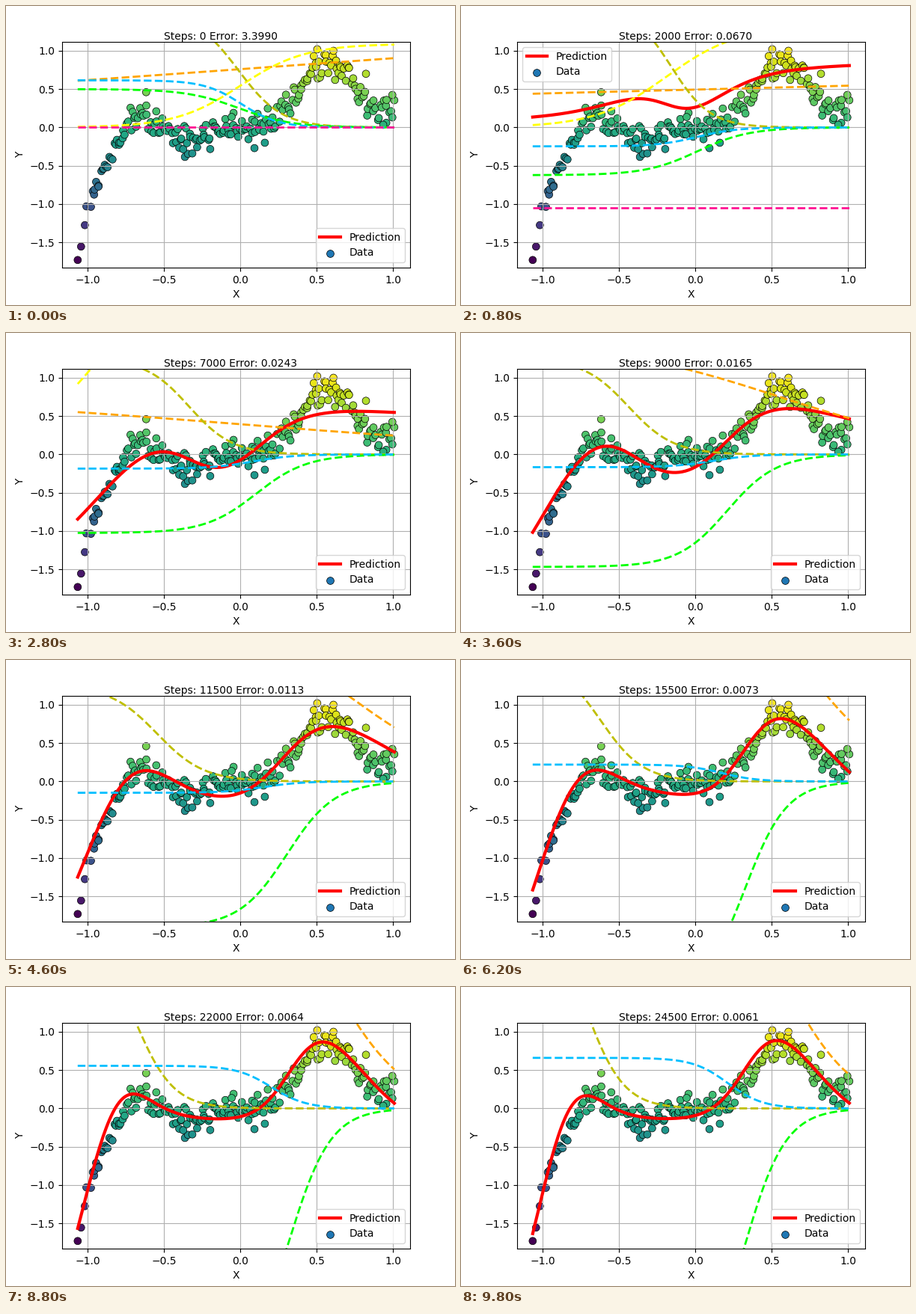
Write a matplotlib script that moves like this. It is 600x400 px and loops after 10 s.

```python
import numpy as np
import matplotlib.pyplot as plt
from matplotlib.animation import FuncAnimation

FRAMES, INTERVAL, STEPS_PER_FRAME = 50, 200, 500
X_MIN, X_MAX = -1.065, 1.0075


def bell(x, height, centre, width):
    return height * np.exp(-((x - centre) / width) ** 2)


def trend(x):
    return (-1.7 * np.exp((X_MIN - x) / .15) + bell(x, .3, -.66, .15)
            + bell(x, -.15, -.33, .2) + bell(x, .88, .58, .25) + bell(x, .2, 1.02, .1))


def neuron(x, v, w, b):
    return v / (1 + np.exp(-(w * x + b)))


# Evenly spread noisy samples, plus the sparse left tail and a few outliers
rng = np.random.default_rng(7)
n = 210
sample_x = np.linspace(-.98, 1.0, n) + rng.uniform(-.006, .006, n)
noise = np.clip(rng.normal(0, .1, n), -.18, .18) * np.interp(sample_x, [-.95, -.7], [.5, 1])
extra = np.array([
    (-1.065, -1.73), (-1.043, -1.555), (-1.018, -1.275), (-1.008, -1.03),
    (-.617, .46), (-.363, -.385), (-.343, -.345), (.503, 1.02), (.62, .62),
    (.16, -.2), (.092, -.27), (.955, .06), (-.045, .19), (.822, .7), (1.0075, .355)])
data_x = np.r_[extra[:, 0], sample_x]
data_y = np.r_[extra[:, 1], np.minimum(trend(sample_x) + noise, 1.0)]

# Training milestones: per neuron the amplitude v, weight w and bias b
milestones = [0, 4000, 7000, 11500, 15500, 24500]
neurons = {
    "orange": ([1.5, .88, .8, 2.2, 3.2, 3.2],
               [.385, .187, -.78, -2.6, -3.3, -4.45],
               [.03, .062, -.03, 1.87, 2.22, 2.65]),
    "yellow": ([1.09, 1.36, 2.66, 3.8, 5, 6.4],
               [4.7, 4.2, 3.65, 5.6, 5.3, 6.2],
               [0, .93, 3.25, 5.55, 5.33, 6.1]),
    "y": ([1.5, 1.6, 1.25, 1.25, 1.58, 2.6],
          [-7, -7.9, -7, -6.5, -7.2, -8],
          [-.1, -1.4, -2.35, -3.55, -4.45, -5.75]),
    "lime": ([.5, -.79, -1.025, -1.9, -2.8, -3.6],
             [-5.8, -5.9, -6, -6.4, -7.3, -7.4],
             [-.05, .1, .62, 1.95, 2.37, 2.38]),
    "deepskyblue": ([.615, -.375, -.185, -.148, .22, .66],
                    [-8.2, -7.7, -7.5, -8, -8.7, -8.7],
                    [.05, .1, .6, 1.2, 1.5, 1.85]),
}
offset = [0, -1.21, -2.35, -4.1, -5.655, -6.75]
error = [3.399, .0373, .0243, .0113, .0073, .0061]


def pace(step):
    """Training moves fast at first, so values drift evenly in log time."""
    return np.log1p(np.asarray(step) / 20)


def at(step, values):
    return np.interp(pace(step), pace(milestones), values)


fig = plt.figure(figsize=(6, 4), dpi=100)
ax = fig.add_axes([.125, .125, .775, .755])
ax.set(xlim=(-1.167, 1.111), ylim=(-1.8295, 1.1165), xlabel="X", ylabel="Y")
ax.grid(True)

dots = dict(s=50, edgecolors="black", linewidths=.5)
ax.scatter(data_x, data_y, c=data_y, cmap="viridis", **dots)
data_key = ax.scatter([], [], c="C0", **dots)

xs = np.linspace(X_MIN, X_MAX, 200)
fit_line, = ax.plot(xs, 0 * xs, "r", lw=3)
parts = [ax.plot(xs, 0 * xs, "--", color=c, lw=2)[0] for c in neurons]
offset_line, = ax.plot(xs, 0 * xs, "--", color="deeppink", lw=2)
ax.legend([fit_line, data_key], ["Prediction", "Data"], loc="best")
title = ax.text(-.5, 1.15, "", fontsize=10)


def update(frame):
    step = frame * STEPS_PER_FRAME
    total = np.full_like(xs, at(step, offset))
    offset_line.set_ydata(total.copy())
    for line, params in zip(parts, neurons.values()):
        ys = neuron(xs, *(at(step, p) for p in params))
        line.set_ydata(ys)
        total += ys
    fit_line.set_ydata(total)
    title.set_text(f"Steps: {step} Error: {np.exp(at(step, np.log(error))):.4f}")
    return [*parts, offset_line, fit_line, title]


anim = FuncAnimation(fig, update, frames=FRAMES, interval=INTERVAL,
                     repeat=True, repeat_delay=0, blit=False)
plt.show()
```
